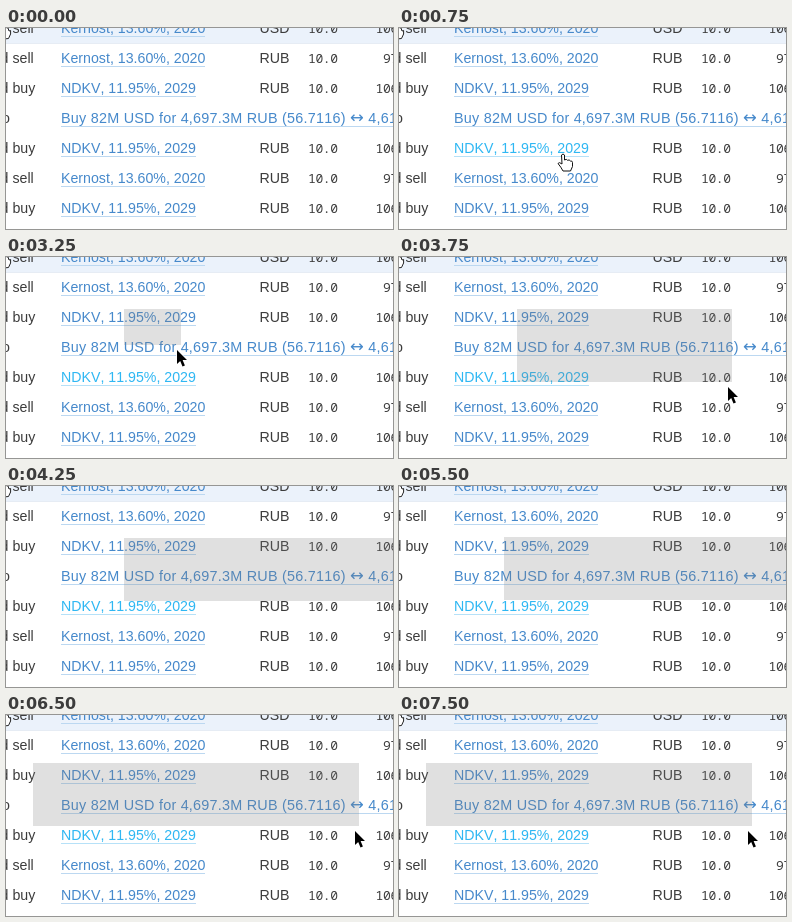
These frames come from a looping animation (387x201 px, 8 s). An HTML page:

```html
<!DOCTYPE html>
<html lang="en">
<head>
<meta charset="utf-8">
<title>Deal list selection</title>
<style>
html, body { margin: 0; width: 100%; height: 100%; overflow: hidden; background: #fff; }
#stage { position: relative; width: 387px; height: 201px; overflow: hidden;
  font: 14.2px "Liberation Sans", Arial, sans-serif; font-kerning: none; color: #3c3c3c; }
.row { position: absolute; left: 0; width: 387px; height: 30px; line-height: 30px; white-space: pre; }
.row:first-child { background: #ebf2fb; border-bottom: 1px solid #e6ecf4; }
.row span { position: absolute; top: 0; }
.row b { font-weight: 400; color: #4689cb; border-bottom: 1px solid #bcd8f1; }
.row b.hover { color: #2fb7f3; border-color: #b6e1f8; }
.row i { font: 16.5px/0 "DejaVu Sans", sans-serif; }
.wide { font-size: 14.4px; letter-spacing: .23px; }
.num { font: 13px/30px "Noto Sans Mono", "DejaVu Sans Mono", monospace; letter-spacing: -.4px; }
#sel { position: absolute; background: rgba(128, 128, 128, .244); }
svg { position: absolute; left: 0; top: 0; overflow: visible; }
</style>
</head>
<body>
<div id="stage">
  <div id="sel"></div>
  <svg width="387" height="201">
    <path d="M-2 -1L2 0 3 3 4.6 2.5 4.6 6 2.5 10.5 -2 11" fill="#fff" stroke="#222"/>
    <path id="arrow" d="M0 0v14l3.2-3 2.3 5.4 2.4-1-2.3-5.3h4.4z"
      fill="#000" stroke="#fff" stroke-width="1.6" paint-order="stroke"/>
    <path id="hand" d="M-1.5 1q1.5-2 3 0v5q2-1.5 3 .3 2-1 2.8.7 2-.5 2.2 1.5v4l-2 4.5h-7.5q-2-4-5-7.500 1-2 4 .5z"
      fill="#fff" stroke="#111"/>
  </svg>
</div>
<script>
const $ = id => document.getElementById(id);
const stage = $('stage'), sel = $('sel');

function addRow(i, cells) {
  const row = document.createElement('div');
  row.className = 'row';
  row.style.top = 30 * i - 15 + 'px';
  row.innerHTML = cells.map(([x, text, cls = '']) =>
    `<span class="${cls}" style="left:${x}px">${text}</span>`).join('');
  stage.insertBefore(row, sel);
  return row.querySelector('b');
}

function bondCells(i) {
  const buy = i > 0 && i % 2 === 0;
  return [
    [-5.4, buy ? 'd buy' : 'd sell'],
    [55, `<b>${buy ? 'NDKV, 11.95%, 2029' : 'Kernost, 13.60%, 2020'}</b>`],
    [253.5, i ? 'RUB' : 'USD'],
    [302, '10.0', 'num'],
    buy || !i ? [369.6, '106.25', 'num'] : [377, '97.50', 'num']
  ];
}

const swapCells = [
  [-4, 'o'],
  [55, '<b>Buy 82M USD for 4,697.3M RUB (56.7116) <i>↔</i> 4,612.5M RUB</b>', 'wide']
];

const links = [];
for (let i = 0; i < 7; i++) links.push(addRow(i, i === 3 ? swapCells : bondCells(i)));

const LOOP = 8000, STEP = 250, DRAG = 2750;
const anchor = { x: 118, y: 52 };

// pointer path: time, x, y
const path = [
  [500, 200, 107], [750, 164, 126], [1750, 164, 126], [2000, 138, 84],
  [2250, 113, 71], [2500, 113, 57], [3000, 119, 54], [3250, 171, 93],
  [3750, 329, 130], [4000, 350, 117], [4250, 440, 120], [LOOP, 440, 120]
];

function pointerAt(t) {
  const k = Math.max(1, path.findIndex(p => p[0] > t));
  const [t0, x0, y0] = path[k - 1], [t1, x1, y1] = path[k];
  const u = (t - t0) / (t1 - t0);
  return { x: x0 + (x1 - x0) * u, y: y0 + (y1 - y0) * u };
}

function smooth(t, from, to) {
  const u = Math.min(1, Math.max(0, (t - from) / (to - from)));
  return u * u * (3 - 2 * u);
}

function place(el, x, y, on) {
  el.setAttribute('transform', `translate(${x} ${y})`);
  el.style.display = on ? '' : 'none';
}

function draw(now) {
  const t = Math.floor(now % LOOP / STEP) * STEP;
  const p = pointerAt(t);
  // the finished selection is carried to the left
  const shift = smooth(t, 5250, 6300);
  const dx = -91 * shift, dy = -4 * shift;

  place($('hand'), p.x, p.y, t >= 500 && t < 2000);
  place($('arrow'), p.x + dx, p.y + dy, t >= 2000);
  links[3].classList.toggle('hover', t === 500);
  links[4].classList.toggle('hover', t >= 750);

  const width = Math.max(1, p.x + 4 - anchor.x);
  const height = Math.max(1, p.y - 5 - anchor.y);
  sel.style.display = t >= DRAG ? '' : 'none';
  sel.style.left = Math.round(anchor.x + dx) + 'px';
  sel.style.top = Math.round(anchor.y + dy) + 'px';
  sel.style.width = Math.round(width) + 'px';
  sel.style.height = Math.round(height) + 'px';
}

const start = performance.now();
function tick() {
  draw(performance.now() - start);
  requestAnimationFrame(tick);
}
tick();
</script>
</body>
</html>
```
